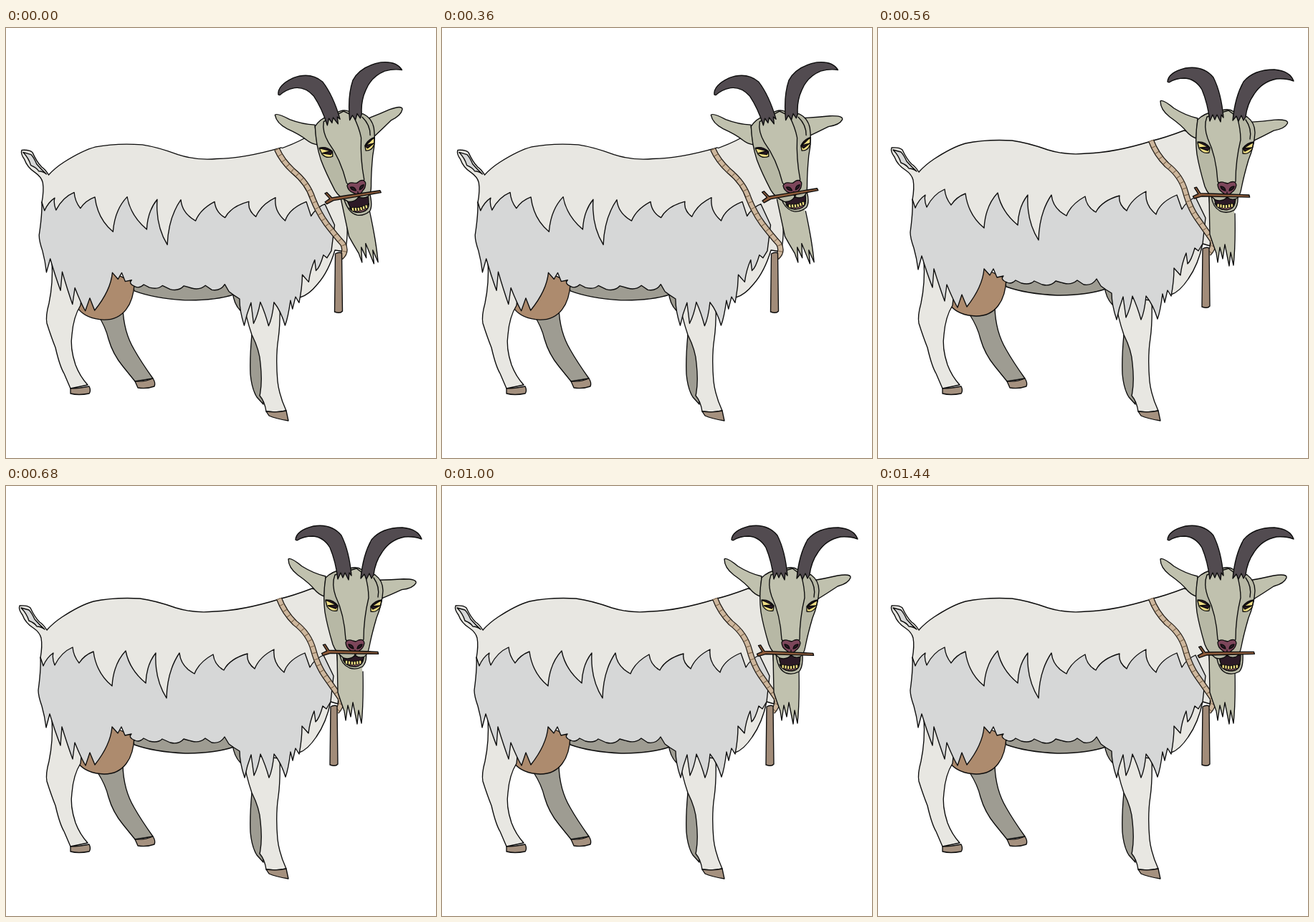
An HTML page that plays this animation: 600x600 px, repeating every 1480 ms.

```html
<!DOCTYPE html>
<html lang="en">
<head>
<meta charset="utf-8">
<title>Goat</title>
<style>
html, body { margin: 0; width: 100%; height: 100%; overflow: hidden; background: #fff; }
svg { display: block; width: 100vw; height: 100vh; }
path { stroke: #0c0c0c; stroke-width: 1.35; stroke-linejoin: round; stroke-linecap: round; }
.line { fill: none; }
.bare { stroke: none; }
.white { fill: #e8e7e2; }
.wool { fill: #d6d7d7; }
.shade { fill: #9e9c92; }
.udder { fill: #ad8b6e; }
.hoof { fill: #a5917f; }
.skin { fill: #c0c1ae; }
.side { fill: #b7b8a5; }
.horn { fill: #524b50; }
.eye { fill: #efdd83; }
.dark { fill: #2c1a26; }
.lip { fill: #8b5d6b; }
.nose { fill: #7d465b; }
.twig { fill: #8d5b3a; }
.rope { fill: none; stroke: #cdb69c; stroke-width: 6; stroke-linecap: butt; }
.edge { stroke: #1c1712; stroke-width: 8.4; }
.twist { stroke: #80694f; stroke-dasharray: 1.1 8; }
.block { fill: #a28c79; }
</style>
</head>
<body>
<svg viewBox="0 0 600 600">
  <!-- far legs -->
  <path class="shade" d="M128 400Q139 417 143 434Q149 455 163 472L180 493L205 489Q188 465 179 449Q164 424 163 390Z"/>
  <path class="hoof" d="M180 493Q194 494 205 489Q209 495 207 500Q196 504 184 502Z"/>
  <path class="shade" d="M343 428Q340 460 341 483Q343 504 350 515L359 525L360 440Z"/>

  <g id="under">
    <path class="shade" d="M174 345L179 361Q207 371 250 373Q292 373 318 364L326 350Z"/>
    <path class="shade" d="M316 360Q318 377 327 386L333 370Z"/>
    <path class="udder" d="M101 387Q112 401 137 402Q157 402 168 387Q178 374 179 350L147 335L110 365Z"/>
  </g>

  <!-- near legs -->
  <path class="white" d="M64 325Q66 355 60 384Q55 402 57 412Q63 431 69 446Q75 472 81 482L90 503L114 498Q103 486 97 470Q89 446 92 428Q94 403 104 387L108 350Z"/>
  <path class="hoof" d="M90 503Q102 503 116 500Q119 506 116 510Q101 513 90 510Z"/>
  <path class="white" d="M330 375Q335 405 343 428Q354 450 355 468Q358 495 354 513Q361 521 363 535Q379 537 391 534Q381 512 379 493Q376 459 380 433Q383 411 382 380Z"/>
  <path class="hoof" d="M363 535Q379 537 391 534L394 548Q376 545 367 541Z"/>

  <path id="neck" class="white"/>

  <g id="body">
    <path class="white bare" d="M57 201Q66 191 78 183Q104 166 122 161Q151 155 187 157Q209 160 237 170Q263 178 291 175Q329 174 381 158L443 262L445 300L410 345L200 350L60 310L45 285L50 215Z"/>
    <path class="line" d="M57 201Q66 191 78 183Q104 166 122 161Q151 155 187 157Q209 160 237 170Q263 178 291 175Q329 174 381 158"/>
    <path class="white" d="M48 240Q51 223 49 212Q47 204 38 198Q27 191 23 180Q17 172 19 167Q30 166 34 170Q40 183 47 190Q52 193 57 201"/>
    <path class="wool" d="M21 170Q29 178 32 188Q40 191 43 196Q49 196 54 200Q46 193 40 186Q36 177 32 173Z"/>
    <path id="wool" class="wool" d="M48 239L52 251Q57 239 66 233Q64 240 68 250Q77 232 93 225Q94 237 102 247Q109 236 122 231Q126 261 148 279Q150 248 167 230Q172 256 195 275Q196 249 209 233Q207 269 224 296Q225 258 242 233Q244 252 263 262Q269 246 289 235Q291 250 304 257Q312 241 337 234Q335 246 347 255Q354 238 374 228Q372 247 388 260Q393 243 417 233L424 253Q431 241 443 236L457 265L453 301L447 311L442 307Q437 325 432 329L430 314Q424 328 422 345L413 335Q413 354 409 374L404 366L400 383L397 371Q394 395 390 406Q384 386 374 374Q372 396 367 407Q362 389 355 374Q352 392 346 404L342 375Q336 391 333 407Q326 386 326 370L318 365L311 360L305 350Q299 360 287 358L278 352Q270 359 259 356L248 353Q241 361 229 358L218 353Q212 359 200 356L192 352Q186 358 180 355Q170 351 175 346L166 348L161 336L156 345L148 336Q146 361 124 389L117 372L111 390Q105 380 96 358L93 381Q86 362 78 336L76 362Q69 344 61 318L56 337Q54 321 50 307Q45 293 45 285Q49 256 48 239Z"/>
  </g>

  <g id="halter">
    <path class="rope edge"/><path class="rope"/><path class="rope twist"/>
  </g>
  <path id="block" class="block" d="M453 308Q458 305 462 307L463 388Q460 392 452 389Z"/>

  <g id="head">
    <path class="skin" d="M446 126Q429 122 413 112Q397 99 394 102Q394 114 407 124Q424 136 431 145Q436 151 444 154Z"/>
    <path id="ear" class="skin" d="M517 132Q535 129 552 125Q571 122 570 128Q567 136 552 140Q537 150 524 158Z"/>
    <path class="skin bare" d="M462 228L463 288L467 300L473 315L474 327L477 306L481 322L484 302L490 332L492 313L496 331Q499 303 497 255L503 235Z"/>
    <path class="line" d="M462 235L463 288L467 300L472 314L474 327L477 306L481 322L484 302L490 332L492 313L496 331Q499 303 498 259"/>

    <g id="jaw"><path id="chin" class="side"/><path id="mouth" class="dark"/><path id="gum" class="lip"/><path id="teeth" class="eye" stroke-dasharray="1 0" style="stroke-width:.7"/></g>

    <path class="side" d="M446 128Q455 119 468 117L484 114Q491 113 497 117L515 124Q526 132 526 146Q525 165 517 184Q510 208 507 224Q505 235 500 238Q493 241 487 236Q481 243 471 240Q460 232 456 221Q448 194 445 176Q442 153 446 128Z"/>
    <path class="skin" d="M459 124Q454 137 460 154Q472 179 474 214L487 233L499 214Q499 185 506 156Q506 141 501 124L489 115Z"/>
    <path class="line" d="M513 128Q522 141 519 155"/>

    <path class="horn" d="M404 75Q405 62 429 56Q454 52 468 69Q479 91 482 125L479 121L478 131L473 121L470 128L467 121L463 130Q460 105 452 86Q443 71 428 70Q415 70 406 76Z"/>
    <path class="horn" d="M580 74Q575 60 553 58Q524 58 510 75Q498 96 495 129L500 123L503 130L507 122L510 129L513 124Q515 106 525 92Q536 75 556 71Q569 70 580 74Z"/>

    <path class="eye" d="M446 160Q456 158 463 168L462 174Q453 176 448 168Z"/>
    <path class="dark" d="M446 159Q456 158 463 167L460 171L449 167L461 166Z"/>
    <path class="eye" d="M524 160Q515 161 509 169L509 175Q517 177 522 169Z"/>
    <path class="dark" d="M524 159Q515 160 509 168L512 172L522 167L510 168Z"/>

    <path class="nose" d="M474 218Q477 213 484 216L488 217L492 215Q499 213 500 219Q499 226 494 229L488 235L480 229Q474 225 474 218Z"/>
    <path class="dark" d="M478 221Q484 221 485 227Q479 226 478 221ZM497 221Q491 221 490 227Q496 226 497 221Z"/>
    <path class="line" d="M487 229V237"/>
    <path id="twig" class="twig" d="M-39 -4L-36 -5L-30 3L-10 2L38 0L39 3L8 5L-28 7L-38 11L-40 8L-33 4Z"/>
  </g>
</svg>
<script>
const LOOP = 1480, STEP = 40, CHEW = 500;
const $ = id => document.getElementById(id);
const set = (id, name, value) => $(id).setAttribute(name, value);

// Two poses of the parts that bend: head tilted, head upright
const NECK = [
  'M378 170Q400 163 420 152L450 150L476 272Q477 297 473 312L459 310Q450 340 435 357Q422 373 410 376L400 300Z',
  'M380 158Q401 153 427 143L455 150L464 262Q465 290 463 304L453 301Q447 330 433 350Q421 368 409 372L400 300Z'
];
const ROPE = [
  'M378 169Q385 185 400 199Q421 216 428 238Q436 258 447 273Q460 290 470 301Q476 312 467 320',
  'M381 157Q388 176 403 191Q423 206 429 229Q435 251 445 265Q457 282 466 295Q471 304 461 315'
];

const TURN = [[360, 0], [400, .5], [440, .92], [480, .97], [560, 1]];
const FLICK = [[0, 0], [280, 0], [360, 18], [440, 1.5], [520, 0], [560, 6], [640, 18], [720, 0]];
const OPEN = [[0, 1], [60, .3], [140, 0], [300, 0], [360, .3], [440, 1], [500, 1]];
const SLIDE = [[0, -2], [60, -3], [300, -2], [360, 0], [440, 4], [500, -2]];
const TWIG_X = [[0, 480], [60, 480], [300, 482], [360, 482], [440, 486.5], [500, 480]];
const TWIG_Y = [[0, 230], [60, 230], [300, 227], [360, 228], [440, 230], [500, 230]];
const TWIG_TURN = [[0, 5], [60, 4.5], [300, 4], [360, 4], [440, 2], [500, 5]];

function at(keys, t) {
  if (t <= keys[0][0]) return keys[0][1];
  for (let i = 1; i < keys.length; i++) {
    const [t0, v0] = keys[i - 1], [t1, v1] = keys[i];
    if (t <= t1) return v0 + (v1 - v0) * (t - t0) / (t1 - t0);
  }
  return keys[keys.length - 1][1];
}

function blend([a, b], p) {
  const goal = b.match(/[\d.]+/g);
  let i = 0;
  return a.replace(/[\d.]+/g, n => (+n + (goal[i++] - n) * p).toFixed(2));
}

function drawJaw(open, slide) {
  const low = 255 + 7 * open, mid = 247 + 6 * open;
  set('jaw', 'transform', `translate(${slide} 0)`);
  set('chin', 'd', `M468 234Q470 ${low - 6} 482 ${low - 1}Q491 ${low + 2} 500 ${low - 3}Q506 ${low - 9} 505 234Z`);
  set('mouth', 'd', `M472 237Q474 ${mid + 1} 482 ${mid + 4}Q490 ${mid + 6} 497 ${mid + 2}Q502 ${mid - 3} 502 236Z`);
  set('gum', 'd', `M473 ${mid - 4}Q479 ${mid + 1} 488 ${mid + 1}Q497 ${mid} 501 ${mid - 5}Q500 ${mid + 4} 490 ${mid + 5}Q477 ${mid + 5} 473 ${mid - 4}Z`);
  let teeth = '';
  for (let i = 0; i < 6; i++) {
    const x = 476 + i * 3.8, y = mid - Math.abs(i - 2.5) * .7;
    teeth += `M${x} ${y - 2}h3.4v4.5q-1.7 1.5 -3.4 0z`;
  }
  set('teeth', 'd', teeth);
}

function draw(t) {
  const p = at(TURN, t), q = 1 - p, c = t % CHEW;
  const sway = `matrix(1 ${.015 * q} ${-.015 * q} 1 ${5.5 * q} ${3.1 * q})`;
  set('under', 'transform', sway);
  set('body', 'transform', sway);
  set('neck', 'd', blend(NECK, p));
  const rope = blend(ROPE, p);
  for (const strand of $('halter').children) strand.setAttribute('d', rope);
  set('block', 'transform', `translate(${6.5 * q} ${7 * q})`);
  set('head', 'transform', `translate(${2.5 * q} ${-.5 * q}) rotate(${-11 * q} 487 222)`);
  set('ear', 'transform', `rotate(${at(FLICK, t)} 523 144)`);
  set('twig', 'transform', `translate(${at(TWIG_X, c)} ${at(TWIG_Y, c)}) rotate(${at(TWIG_TURN, c)})`);
  drawJaw(at(OPEN, c), at(SLIDE, c));
}

const start = performance.now();
function tick() {
  const t = (performance.now() - start) % LOOP;
  draw(Math.floor(t / STEP) * STEP);
  requestAnimationFrame(tick);
}
draw(0);
requestAnimationFrame(tick);
</script>
</body>
</html>
```
